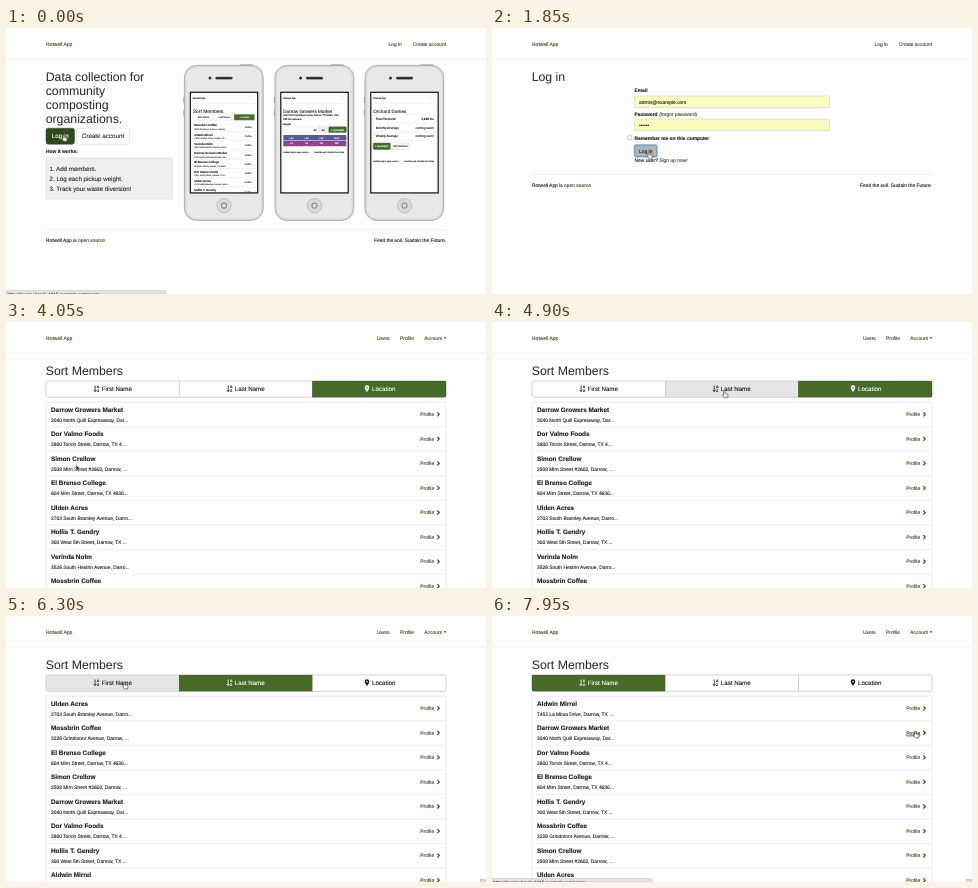
An HTML page for the animation above (8000 ms loop, 480 px wide and 266 px high).

```html
<!DOCTYPE html>
<html lang="en">
<head>
<meta charset="utf-8">
<title>Rotwell App</title>
<style>
  html, body { margin: 0; width: 100%; height: 100%; overflow: hidden; background: #fdfdfd; }
  svg { display: block; width: 100%; height: 100%; }
  text { font-family: "Liberation Sans", Arial, sans-serif; text-rendering: geometricPrecision; white-space: pre; }
  .scene, .pointer { opacity: 0; }
</style>
</head>
<body>
<svg id="stage" viewBox="0 0 480 266"></svg>
<script>
const LOOP = 8000;
const INK = '#181818', LIGHT = '#262626', LINK = '#2f4a18', LINE = '#d8d8d8';
const GREEN = '#466b28', DARK = '#30481d', GREEN_EDGE = '#3a5a20';

// Drawing helpers; y of text is its baseline. Small text gets a hairline to keep its weight.
const text = (x, y, s, size = 4.9, fill = INK, extra = '') =>
  `<text x="${x}" y="${y}" font-size="${size}" fill="${fill}" ` +
  `${size < 7 ? `stroke="${fill}" stroke-width=".1"` : ''} ${extra}>${s}</text>`;
const bold = (x, y, s, size = 4.9, fill = INK) => text(x, y, s, size, fill, 'font-weight="700"');
const right = (x, y, s, size = 4.9, fill = INK) => text(x, y, s, size, fill, 'text-anchor="end"');
const center = (x, y, s, size, fill) => text(x, y, s, size, fill, 'text-anchor="middle"');
const link = s => `<tspan fill="${LINK}" stroke="${LINK}">${s}</tspan>`;
const box = (x, y, w, h, fill = '#fff', stroke = LINE, r = 0, sw = .5) =>
  `<rect x="${x}" y="${y}" width="${w}" height="${h}" rx="${r}" fill="${fill}" stroke="${stroke}" stroke-width="${sw}"/>`;
const path = (d, fill, stroke = 'none', sw = .5) =>
  `<path d="${d}" fill="${fill}" stroke="${stroke}" stroke-width="${sw}" fill-rule="evenodd"/>`;
const dashed = (x1, x2, y, color = LINE) =>
  `<path d="M${x1} ${y}H${x2}" stroke="${color}" stroke-width=".6" stroke-dasharray="1.2 .8"/>`;
const title = s => text(39.7, 53.3, s, 12.3, LIGHT);
const button = (x, y, w, h, label, fill, size = 6.25) => {
  const plain = fill === '#fff';
  return box(x, y, w, h, fill, plain ? '#ccc' : fill, size / 3) +
    center(x + w / 2, y + h / 2 + size * .35, label, size, plain ? LIGHT : '#fff');
};

const header = signedIn => text(40, 17.5, 'Rotwell App', 5, LINK) + dashed(0, 480, 31) + (signedIn
  ? text(371, 17.5, 'Users', 4.9, LINK) + text(394, 17.5, 'Profile', 4.9, LINK) +
    text(418.3, 17.5, 'Account', 4.9, LINK) + path('M437.6 15.3h2.8l-1.4 1.6z', LINK)
  : text(382.5, 17.5, 'Log in', 4.9, LINK) + right(440, 17.5, 'Create account', 4.9, LINK));

const footer = y => dashed(40, 440, y) +
  text(40, y + 12.2, `Rotwell App is ${link('open source')}`) +
  right(440, y + 12.2, 'Feed the soil. Sustain the Future.');

const statusBar = path('M0 266V262.6H158.5q1.5 0 1.5 1.5V266z', '#e4e4e4', '#bbb') +
  text(1.5, 268.2, 'https://sunny-brook-4815.example.com/users', 4.6, '#444');

// Members
const members = {
  andrew: ['Aldwin Mirrel', '7452 La Mirsa Drive, Darrow, TX ...'],
  market: ['Darrow Growers Market', '2040 North Quill Expressway, Dar...'],
  foods: ['Dor Valmo Foods', '2600 Torvin Street, Darrow, TX 4...'],
  college: ['El Brenso College', '604 Mirn Street, Darrow, TX 4630...'],
  hollis: ['Hollis T. Gendry', '300 West 5th Street, Darrow, TX ...'],
  coffee: ['Mossbrin Coffee', '3226 Grindmoor Avenue, Darrow, ...'],
  simon: ['Simon Crellow', '2508 Mirn Street #2602, Darrow, ...'],
  plots: ['Ulden Acres', '2703 South Bramley Avenue, Darro...'],
  verinda: ['Verinda Nolm', '3526 South Hestrin Avenue, Darro...']
};
const orders = [
  'andrew market foods college hollis coffee simon plots',
  'plots coffee college simon market foods hollis andrew',
  'market foods simon college plots hollis verinda coffee'
].map(s => s.split(' ').map(key => members[key]));

// Home page phones
function phone(x, screen) {
  const cx = x + 40;
  return box(x - .7, 69, 1.5, 6, '#aaa', 'none') + box(x - .7, 82, 1.5, 6, '#aaa', 'none') +
    box(x + 56, 36.3, 13, 1.5, '#aaa', 'none') +
    box(x + .4, 37.4, 78.8, 155, '#dcdcdc', '#a8a8a8', 12, .9) +
    box(x + 2, 39, 75.6, 151.8, '#e8e8e8', '#d0d0d0', 10.5) +
    box(cx - 8.5, 48.9, 17, 2.4, '#222', '#777', 1.2) +
    `<circle cx="${cx - 14}" cy="50.1" r="1.5" fill="#333"/>` +
    box(x + 6.3, 64.3, 67.4, 100.6, '#fdfdfd', '#111', 0, 1.2) +
    `<circle cx="${cx}" cy="177.6" r="7.2" fill="#d8d8d8" stroke="#b4b4b4" stroke-width=".7"/>` +
    box(cx - 2.4, 175.2, 4.8, 4.8, 'none', '#666', 1.1, .8) +
    `<svg x="${x + 6.8}" y="64.8" width="66.4" height="99.6">` +
    text(2, 6.4, 'Rotwell App', 2.4) + box(58, 3.7, 4.2, 2.8, '#fff', '#ddd', .5, .3) +
    dashed(0, 66, 10.5, '#e4e4e4') + screen + '</svg>';
}
const tinyFooter = y => text(2, y, 'Rotwell App is open source', 2.1) +
  right(63.5, y, 'Feed the soil. Sustain the Future.', 2.1);

function membersPhone() {
  const list = ['coffee', 'andrew', 'verinda', 'market', 'college', 'foods', 'plots', 'hollis'];
  return text(2, 19.8, 'Sort Members', 4.9, LIGHT) +
    ['First Name', 'Last Name', 'Location'].map((label, i) =>
      box(2 + i * 20.6, 21.4, 20.6, 6, i === 2 ? GREEN : '#fff', '#ccc', .4, .3) +
      center(12.8 + i * 20.6, 25.3, label, 2.4, i === 2 ? '#fff' : LIGHT)).join('') +
    list.map((key, i) => {
      const y = 33.6 + i * 9.25, [name, address] = members[key];
      return bold(3.5, y, name, 2.9) + text(3.5, y + 3.5, address, 2.1, '#444') +
        right(61.5, y + 1.4, 'Profile ›', 2.2, LINK) + dashed(2, 64, y + 5.2, '#ddd');
    }).join('');
}
function weightPhone() {
  const row = (y, fill, sign) => box(2, y, 63, 5.3, fill, 'none', .6) +
    [10, 20, 50, 100].map((n, i) => center(10 + i * 15, y + 3.5, sign + n, 2.4, '#fff')).join('');
  return text(2, 19.8, 'Darrow Growers Market', 4.6, LIGHT) +
    text(2, 23.7, '2040 North Quill Expressway, Darrow, TX 46302, USA', 2.3) +
    bold(2, 27.6, '280', 2.4) + text(6.8, 27.6, 'lbs collected', 2.4) + bold(2, 32.7, 'Weight', 2.3) +
    box(2, 34, 36, 5.6, '#fff', '#ccc', .4, .3) + text(32.5, 37.8, '40', 2.6) +
    box(38, 34, 9, 5.6, '#eee', '#ccc', 0, .3) + text(40.5, 37.8, 'lbs', 2.4) +
    button(47.5, 34, 17.5, 5.6, 'Log weight', GREEN, 2.6) +
    row(42.3, '#5d5997', '+') + row(48.2, '#8c458b', '-') + tinyFooter(60.5);
}

const totals = pounds => [
  ['Total Diversion', `<tspan font-weight="700">${pounds}</tspan> lbs`],
  ['Monthly Average', 'coming soon!'],
  ['Weekly Average', 'coming soon!']
];
function summaryPhone() {
  return text(2, 19.8, 'Orchard Dames', 4.7, LIGHT) + box(2, 21.5, 63, 26.4, '#fff', '#ddd', .5, .4) +
    totals('1,248').map(([label, value], i) => text(4.5, 27 + i * 8.8, label, 3.1) +
      right(62.5, 27 + i * 8.8, value, 3.1) + (i ? dashed(2, 65, 21.5 + i * 8.8) : '')).join('') +
    button(2, 50.3, 17, 6.4, 'Log weight', GREEN, 2.6) +
    button(19.8, 50.3, 18, 6.4, 'Add member', '#fff', 2.6) + tinyFooter(69.7);
}

const home = () => header(false) +
  ['Data collection for', 'community', 'composting', 'organizations.']
    .map((s, i) => text(39.7, 53.3 + i * 13.8, s, 12.3, LIGHT)).join('') +
  button(40, 100.2, 28.5, 16, 'Log in', DARK) + button(70.5, 100.2, 53, 16, 'Create account', '#fff') +
  bold(40, 124.6, 'How it works:') + box(40, 130, 126.3, 41, '#efefef', '#d2d2d2', 1) +
  ['Add members.', 'Log each pickup weight.', 'Track your waste diversion!']
    .map((s, i) => text(43.5, 142.5 + i * 10.3, `${i + 1}. ${s}`, 6.2, LIGHT)).join('') +
  phone(178, membersPhone()) + phone(268.5, weightPhone()) + phone(358.5, summaryPhone()) +
  footer(202.2) + statusBar;

const login = pressed => header(false) + title('Log in') +
  bold(142.5, 64.4, 'Email') + box(142.5, 68, 195, 11.6, '#f9fcbe', '#c8c8b0', 1.4) +
  text(147, 75.6, 'admin@example.com') +
  bold(142.5, 87.6, 'Password') + text(167.2, 87.6, '(forgot password)', 4.9, LINK) +
  box(142.5, 91.1, 195, 11.6, '#f9fcbe', '#c8c8b0', 1.4) + text(147, 98.8, '••••••') +
  box(135.7, 107.7, 4.2, 4.2, '#fff', '#999', 1) + bold(142.5, 111.8, 'Remember me on this computer') +
  (pressed
    ? box(142.4, 116.8, 22.7, 12.2, 'none', '#a9cdf0', 1.6, 1.6) +
      box(142.8, 117.2, 21.9, 11.4, '#b4b4b4', '#5c93c9', 1.2, .9)
    : box(142.8, 117.2, 21.9, 11.4, '#fff', '#ccc', 1.2)) +
  center(153.7, 124.7, 'Log in', 4.9, INK) +
  text(142.5, 134.2, `New user? ${link('Sign up now!')}`) + footer(146.5);

const dashboard = hovered => header(true) + title('Orchard Dames') +
  box(40, 59.2, 400, 70.7, '#fdfdfd', LINE, 1.5) +
  totals('1,578').map(([label, value], i) => text(45, 74.2 + i * 23.5, label, 8.2, LIGHT) +
    right(435, 74.2 + i * 23.5, value, 8.2, LIGHT) + (i ? dashed(40, 440, 59.2 + i * 23.5) : '')).join('') +
  button(40, 137, 41.8, 16, 'Log weight', hovered ? DARK : GREEN) +
  button(83.6, 137, 46.9, 16, 'Add member', '#fff') + footer(160.4) +
  box(473.9, 257.9, 5.6, 7.8, '#eee', '#888') +
  path('M475 260.5h3m-1.2-1.2 1.2 1.2-1.2 1.2M475.3 263.8h2.8', 'none', '#222', .8);

const sortIcon = (x, fill) => path(`M${x + 1.4} 63.5V69.5M${x} 68l1.4 1.6 1.4-1.6`, 'none', fill, .8) +
  bold(x + 3.1, 66.2, 'A', 3.6, fill) + bold(x + 3.2, 69.8, 'Z', 3.6, fill);
const pinIcon = (x, fill) =>
  path(`M${x} 70Q${x - 2.5} 66.8 ${x - 2.3} 65.6A2.3 2.3 0 0 1 ${x + 2.3} 65.6Q${x + 2.5} 66.8 ${x} 70Z` +
    `M${x - .8} 65.6a.8 .8 0 1 0 1.6 0a.8 .8 0 1 0-1.6 0`, fill);

function memberPage(active, { hover = -1, profile = -1, corner = active < 2 } = {}) {
  const width = 400 / 3;
  const tabs = [['First Name', 95.7], ['Last Name', 228.8], ['Location', 366]].map(([label, x], i) => {
    const color = i === active ? '#fff' : INK;
    const fill = i === active ? GREEN : i === hover ? '#e5e5e5' : '#fdfdfd';
    return `<rect x="${40 + i * width}" y="59" width="${width}" height="16.2" fill="${fill}" ` +
      `stroke="${i === active ? GREEN_EDGE : '#c8c8c8'}" stroke-width=".7" clip-path="url(#tabs)"/>` +
      (i < 2 ? sortIcon(x - 8, color) : pinIcon(x - 5, color)) + text(x, 69.3, label, 6.2, color);
  });
  const rows = orders[active].map(([name, address], i) => {
    const y = 80.2 + i * 24.55, color = i === profile ? '#16230a' : LINK;
    return (i ? dashed(40, 440, y) : '') + bold(45, y + 9.3, name, 6.4) + text(45, y + 19.4, address) +
      text(414.3, y + 13.9, 'Profile', 4.9, color, i === profile ? 'text-decoration="underline"' : '') +
      path(`M431.3 ${y + 10.1}l2 2-2 2`, 'none', color, 1.1);
  });
  return header(true) + title('Sort Members') + box(40, 59, 400, 16.2, 'none', '#c8c8c8', 2, .7) + tabs.join('') +
    box(40, 80.2, 400, 200, 'none', LINE, 1.5) + rows.join('') +
    (corner ? box(474.5, 263.7, 5, 4, '#ddd', '#aaa') : '') + (profile >= 0 ? statusBar : '');
}

// [start ms, markup]
const scenes = [
  [0, home()],
  [500, login(false)],
  [1700, login(true)],
  [2350, dashboard(false)],
  [3000, dashboard(true)],
  [3800, memberPage(2)],
  [4800, memberPage(2, { hover: 1 })],
  [5450, memberPage(1)],
  [5950, memberPage(1, { hover: 0 })],
  [6450, memberPage(0)],
  [6700, memberPage(0, { hover: 1 })],
  [6950, memberPage(0)],
  [7600, memberPage(0, { profile: 1 })]
];

// [ms, x, y] of the pointer's hot spot
const route = [
  [0, 57.2, 106.5], [800, 57.2, 106.5], [1600, 156.5, 123.6], [2500, 156.5, 123.6],
  [3050, 70, 142.6], [4200, 70, 142.6], [4850, 232, 68.6], [5800, 232, 68.6],
  [6150, 118, 66], [6550, 118, 66], [6800, 204, 61.5], [7650, 422.8, 115], [LOOP, 422.8, 115]
];
// Spans in which the pointer is a plain arrow
const arrowSpans = [[500, 1500], [2350, 3000], [3800, 4800], [6950, 7600]];

const hand = path('M-.3 .6Q.4-.5 1.1 .6V2.9L3.2 3.3Q4.2 3.6 4 4.6L3.5 7H.6L-1.5 4.5Q-1.5 3.5-.3 4.1Z', '#fff', '#222', .6);
const arrow = path('M0 0V6.2L1.5 4.9 2.5 7.1 3.5 6.7 2.5 4.6H4.4Z', '#222', '#fff', .5);

const stage = document.getElementById('stage');
stage.innerHTML = '<clipPath id="tabs"><rect x="39.7" y="58.7" width="400.6" height="16.8" rx="2"/></clipPath>' +
  scenes.map(([, markup]) => `<g class="scene">${markup}</g>`).join('') +
  `<g id="cursor"><g class="pointer">${hand}</g><g class="pointer">${arrow}</g></g>`;

const timing = { duration: LOOP, iterations: Infinity };

// Hard on/off switching, with exactly one keyframe at each end of the loop.
function showDuring(element, spans) {
  const visible = ms => spans.some(([from, to]) => ms >= from && ms < to);
  const times = [...new Set([0, ...spans.flat(), LOOP])];
  element.animate(times.map(ms => ({
    opacity: visible(ms) ? 1 : 0, offset: ms / LOOP, easing: 'step-end'
  })), timing);
}

document.querySelectorAll('.scene').forEach((element, i) =>
  showDuring(element, [[scenes[i][0], i + 1 < scenes.length ? scenes[i + 1][0] : LOOP]]));

const [handShape, arrowShape] = document.querySelectorAll('.pointer');
const edges = [0, ...arrowSpans.flat(), LOOP];
showDuring(arrowShape, arrowSpans);
showDuring(handShape, edges.flatMap((ms, i) => i % 2 ? [] : [[ms, edges[i + 1]]]));

document.getElementById('cursor').animate(route.map(([ms, x, y]) => ({
  transform: `translate(${x}px, ${y}px)`, offset: ms / LOOP, easing: 'ease-in-out'
})), timing);
</script>
</body>
</html>
```
